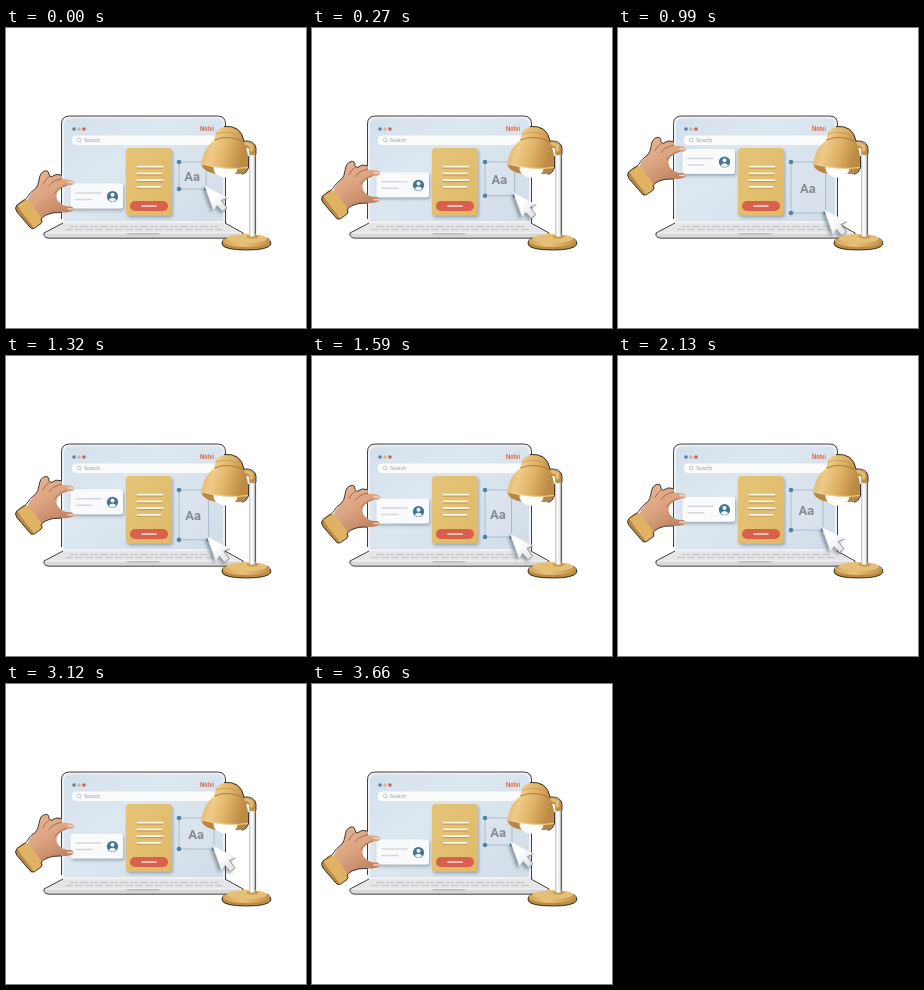
Recreate the animation shown at these times as an HTML page. Size 300 by 300 pixels, loop 3720 ms.

```html
<!DOCTYPE html>
<html lang="en">
<head>
<meta charset="utf-8">
<title>Design desk</title>
<style>
html, body { margin: 0; width: 100%; height: 100%; overflow: hidden; background: #fff; }
svg { display: block; width: 100vw; height: 100vh; }
.round { stroke-linecap: round; stroke-linejoin: round; fill: none; }
.edge { stroke: #14110e; stroke-width: .8; fill: none; }
</style>
</head>
<body>
<svg viewBox="0 0 300 300">
  <defs>
    <linearGradient id="screen" x2="1" y2=".8"><stop stop-color="#d3e0ec"/><stop offset=".4" stop-color="#dde7f0"/><stop offset="1" stop-color="#d3dee8"/></linearGradient>
    <linearGradient id="panel" x2="1" y2="1"><stop stop-color="#e5c478"/><stop offset="1" stop-color="#dfb968"/></linearGradient>
    <linearGradient id="shade" x2="1" y2=".25"><stop stop-color="#d9a85c"/><stop offset=".35" stop-color="#efcb88"/><stop offset=".65" stop-color="#dfb166"/><stop offset="1" stop-color="#bd8a44"/></linearGradient>
    <linearGradient id="base" x2="1"><stop stop-color="#d5a55a"/><stop offset=".4" stop-color="#e9c27a"/><stop offset="1" stop-color="#c4924a"/></linearGradient>
    <linearGradient id="stem" x2="1"><stop stop-color="#bdbdbd"/><stop offset=".35" stop-color="#fff"/><stop offset=".7" stop-color="#ececec"/><stop offset="1" stop-color="#8c8c8c"/></linearGradient>
    <linearGradient id="skin" x2=".6" y2="1"><stop stop-color="#e9b797"/><stop offset=".5" stop-color="#dda582"/><stop offset="1" stop-color="#bd7f5e"/></linearGradient>
    <linearGradient id="arrow" x2="1" y2="1"><stop offset=".4" stop-color="#fff"/><stop offset="1" stop-color="#dcdee2"/></linearGradient>
    <filter id="soft" x="-30%" y="-30%" width="160%" height="170%"><feDropShadow dx="1" dy="2" stdDeviation="1.8" flood-color="#5c6b7a" flood-opacity=".5"/></filter>
    <filter id="cast" x="-50%" y="-30%" width="180%" height="170%"><feDropShadow dx="-2.500" dy="2.500" stdDeviation="1.500" flood-color="#56636f" flood-opacity=".55"/></filter>
  </defs>

  <g id="laptop">
    <path d="M55.500 191V96q0-8 8-8h148q8 0 8 8v99h-160q-4 0-4-4z" fill="#eef0f3"/>
    <path class="edge" d="M55.500 191V96q0-8 8-8h148q8 0 8 8v99"/>
    <path d="M58 193V97q0-6.500 6.500-6.500h146q6.500 0 6.500 6.500v96z" fill="url(#screen)"/>
    <path d="M57 195h162l18 10H38z" fill="#e6e6e8"/>
    <path d="M64 198.500h148M59 201.500h158" stroke="#c9cacd" stroke-width="1.300" stroke-dasharray="8 2"/>
    <path d="M38 205h199v2q-1 3-5 3H43q-4 0-5-3z" fill="#d8d8da"/>
    <path d="M38 205h199" stroke="#f5f5f6"/>
    <path d="M120 205h34q-1 2-4 2h-26q-3 0-4-2z" fill="#c3c4c8"/>
    <path class="edge" d="M57 195L38 205v2.500q1 2.700 5 2.700h189q4 0 5-3V205l-18-10"/>
    <circle cx="68" cy="101" r="1.800" fill="#5683a5"/>
    <circle cx="73" cy="101" r="1.800" fill="#d9b294"/>
    <circle cx="78" cy="101" r="1.800" fill="#d35d48"/>
    <text x="194" y="102.500" font-family="Inter, sans-serif" font-size="5.500" font-weight="700" fill="#d9653f">Nolvi</text>
    <rect x="66" y="107.500" width="146" height="9.500" rx="4" fill="#fbfcfd"/>
    <circle cx="73" cy="111.800" r="1.800" fill="none" stroke="#b4babf" stroke-width=".8"/>
    <path d="M74.300 113.200l1.500 1.500" stroke="#b4babf" stroke-width=".8"/>
    <text x="78" y="114" font-family="Inter, sans-serif" font-size="4.800" font-weight="600" fill="#a5abb1">Search</text>
  </g>

  <g filter="url(#soft)"><rect x="120" y="120" width="46" height="67.500" rx="3.500" fill="url(#panel)"/></g>
  <g class="round" stroke-width="1.700">
    <path d="M131.500 139.800h25M131.500 146.600h24M131.500 153.400h25M131.500 160h23" stroke="#c39c55"/>
    <path d="M131.500 138.600h25M131.500 145.400h24M131.500 152.200h25M131.500 158.800h23" stroke="#fdf7e9"/>
  </g>
  <rect x="124" y="173" width="38" height="10" rx="5" fill="#d9604b"/>
  <path class="round" d="M136 178h14" stroke="#fbe4dc" stroke-width="1.600"/>

  <g fill="#5184a3">
    <rect id="frame" x="173" y="134" fill="#dfe7ef" fill-opacity=".4" stroke="#9db4c6" stroke-width=".8"/>
    <circle cx="173" cy="134" r="2.300"/>
    <circle id="right" cy="134" r="2.300"/>
    <circle id="bottom" cx="173" r="2.300"/>
    <circle id="corner" r="2.300"/>
  </g>
  <text id="letters" text-anchor="middle" font-family="Roboto, sans-serif" font-size="13" font-weight="700" fill="#868b90">Aa</text>

  <g id="card">
    <g filter="url(#soft)"><rect x="64.500" width="52.500" height="25" rx="2.500" fill="#f9fafb"/></g>
    <path class="round" d="M70 9.500h25M70 16h16" stroke="#d4d7db" stroke-width="1.600"/>
    <circle cx="106.500" cy="13" r="5.600" fill="#447590"/>
    <circle cx="106.500" cy="11.200" r="2" fill="#f1f5f8"/>
    <path d="M102.600 16.500q3.900-4.600 7.800 0-3.900 3.400-7.800 0" fill="#f1f5f8"/>
  </g>

  <g id="hand">
    <path d="M20 33Q23 23 30 17Q32 15 33 9Q34 1 39 0Q43-1 43 4L45 6Q50 2 55 4Q57 6 55 8L61 8.500Q68 9 68.500 12Q67 15 62 14Q56 16 52 20Q49 25 52 30Q57 36 65 35.500Q69 37 67 39.500Q63 42 54 41.500Q46 41 40 44Q35 47 31 51Z" fill="url(#skin)"/>
    <path class="round" d="M55 8Q47 9 43 15M44 5Q39 8 37 13M61 14Q53 16 49 22" stroke="#a96c4f" stroke-width="1"/>
    <path class="round" d="M62 11l5 .7M62 38l4.500 0" stroke="#f5d3bf" stroke-width="1.600"/>
    <path d="M16 29Q20 27 24 31L35 46Q38 50 35 52.500L29 56.500Q26 59 23 55L11 41Q8 37 11 34Z" fill="#dfb363"/>
    <path d="M11 34Q13 36 15 40L26 54Q28 57 26 58Q25 58 23 55L11 41Q8 37 11 34Z" fill="#b98947"/>
    <path class="edge" d="M55 41.500Q46 41 40 44Q37 46 35 48Q37 51 35 52.500L28 57.500Q25 58 23 55L11 41Q8 37 11 34L20 28Q24 21 30 17Q32 15 33 9Q34 1 39 0Q43-1 43 4L45 6Q50 2 55 4"/>
  </g>

  <g id="cursor" filter="url(#cast)">
    <path d="M0-2L22.500 10L16.500 12.500L22 20L18 23L12 16.500L8.500 21.500Z" fill="url(#arrow)" stroke="#eceef0" stroke-width=".8" stroke-linejoin="round"/>
    <path d="M22.500 10L16.500 12.500L22 20L18 23" fill="none" stroke="#6d7073" stroke-width=".7"/>
  </g>

  <g id="lamp">
    <path d="M216 215Q216 211 221 210H261Q265 212 265 216Q263 222 240.500 222Q218 222 216 217Z" fill="#bd8c44"/>
    <path class="edge" d="M221 210Q216 211 216 216Q218 222 240.500 222Q263 222 265 216Q265 212 261 210"/>
    <ellipse cx="240.500" cy="213" rx="23.500" ry="6" fill="url(#base)"/>
    <ellipse cx="241" cy="210.500" rx="20" ry="4.500" fill="#e6bf77"/>
    <ellipse cx="246.500" cy="208.500" rx="6" ry="2.200" fill="#cb9a50"/>
    <path d="M243 122h6.500v86q-3 1.500-6.500 0z" fill="url(#stem)"/>
    <path d="M249.600 126v80" stroke="#302820" stroke-width=".7"/>
    <path class="round" d="M231 118Q239 114 246.500 119V124" stroke="#bf8e47" stroke-width="6.500"/>
    <path class="round" d="M230 117Q239 113 245.500 118V122" stroke="#e4b970" stroke-width="3.500"/>
    <path class="edge" d="M237 113Q249 112 250 120v6"/>
    <path d="M195 136Q197 144 211 146H236Q241 144 242 140Z" fill="#b98745"/>
    <ellipse cx="219.500" cy="140" rx="12" ry="9.500" fill="#fffdf8"/>
    <path d="M195 136Q198 119 208 112.500L210 104Q217 96 228 99Q237 102 238 114Q243 124 242.500 140Q222 143 195 136Z" fill="url(#shade)"/>
    <path d="M208.500 112Q222 106 238 114" fill="none" stroke="#a97a39" stroke-width="1"/>
    <path d="M210 106Q222 102 236 108" fill="none" stroke="#c79752" stroke-width=".8"/>
    <path d="M195.500 136Q221 142.500 242 139.500" fill="none" stroke="#f2d59c" stroke-width="1"/>
    <path class="edge" d="M218 98.500Q235 97 238 113M242.500 128V140Q241 145 236 146.500"/>
  </g>
</svg>
<script>
const LOOP = 3720, STEP = 30, LAST = 3660;
const times = [0, 510, 990, 1590, 2610, 3120, LAST];
const tracks = {
  hand: [143, 121.5, 109.5, 129.5, 125.5, 130.5, 143],
  card: [155.5, 130.5, 121, 142.5, 138, 149.5, 155.5],
  x: [200, 206, 207.5, 199.5, 210.5, 208, 200],
  y: [161, 176.5, 185, 181, 168, 165, 161]
};
const $ = id => document.getElementById(id);
const set = (id, attrs) => { for (const k in attrs) $(id).setAttribute(k, attrs[k]); };
const move = (id, x, y) => set(id, { transform: `translate(${x} ${y})` });

// Smooth curve through the poses, at rest where the loop closes.
function slope(v, i) {
  return i && i < v.length - 1 ? (v[i + 1] - v[i - 1]) / (times[i + 1] - times[i - 1]) : 0;
}
function sample(v, t) {
  let i = 0;
  while (i < times.length - 2 && t >= times[i + 1]) i++;
  const d = times[i + 1] - times[i], u = (t - times[i]) / d, s = u * u * (3 - 2 * u);
  return v[i] + (v[i + 1] - v[i]) * s
    + d * u * (1 - u) * (slope(v, i) * (1 - u) - slope(v, i + 1) * u);
}

function draw(now) {
  const t = Math.min(LAST, Math.floor(now % LOOP / STEP) * STEP);
  const x = sample(tracks.x, t), y = sample(tracks.y, t);
  move('hand', 0, sample(tracks.hand, t));
  move('card', 0, sample(tracks.card, t));
  move('cursor', x - 1, y - 1);
  set('frame', { width: x - 173, height: y - 134 });
  set('right', { cx: x });
  set('bottom', { cy: y });
  set('corner', { cx: x, cy: y });
  set('letters', { x: (173 + x) / 2 - .5, y: (134 + y) / 2 + 5 });
}

let start;
function tick(now) {
  start ??= now;
  draw(now - start);
  requestAnimationFrame(tick);
}
draw(0);
requestAnimationFrame(tick);
</script>
</body>
</html>
```
